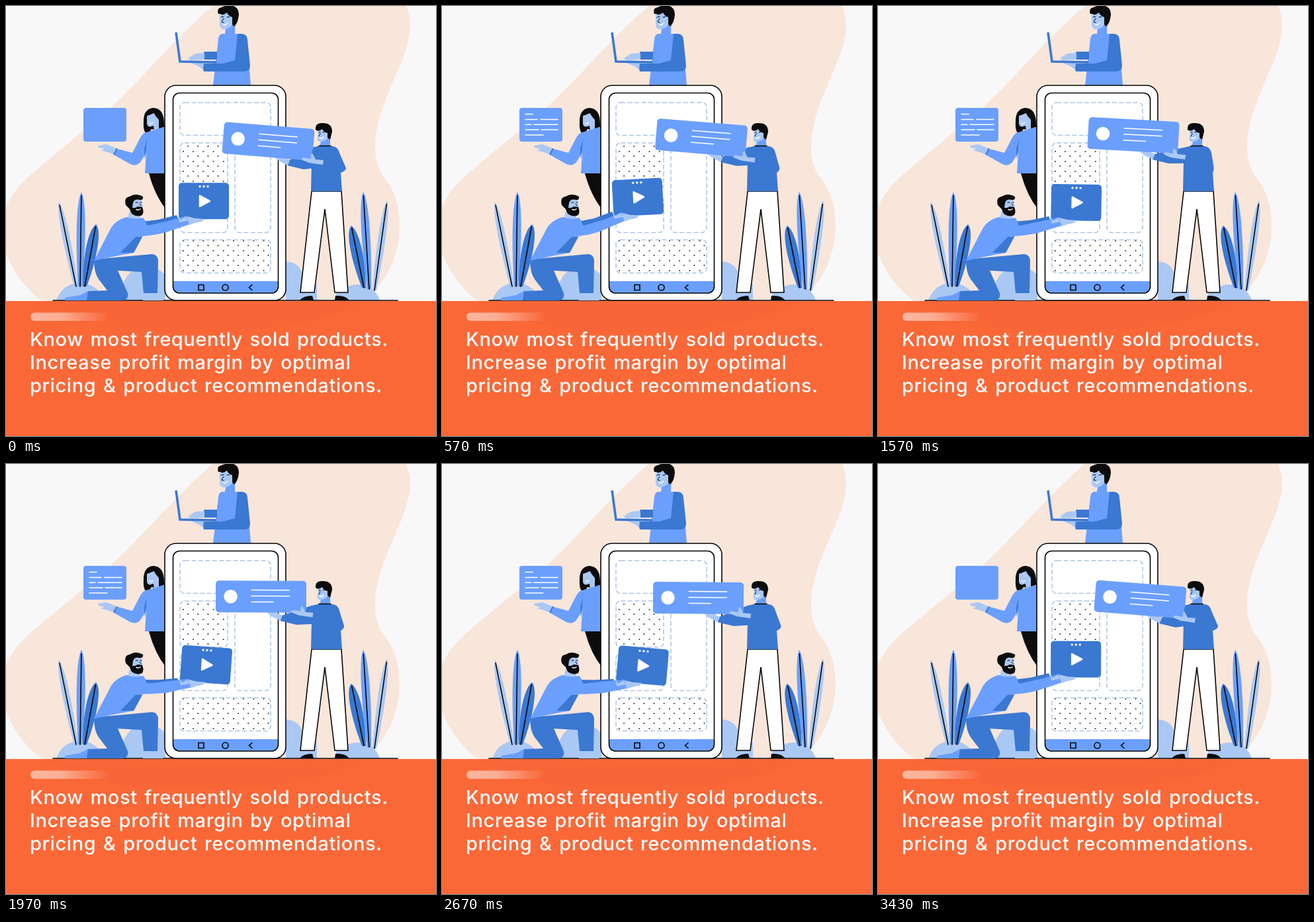
These frames come from a looping animation (650x650 px, 3460 ms). An HTML page:

```html
<!DOCTYPE html>
<html lang="en">
<head>
<meta charset="utf-8">
<title>Product insights</title>
<style>
  html, body { margin: 0; width: 100%; height: 100%; overflow: hidden; background: #f8f8f8; }
  svg { display: block; width: 650px; height: 650px; }
  .mid { fill: #6b9ffd; }
  .dark { fill: #3a78d2; }
  .light { fill: #aac8f4; }
  .ink { fill: #0c0c0c; }
  .white { fill: #fff; }
  .line { fill: none; stroke: #060606; stroke-width: 1.6; stroke-linecap: round; }
  .thin { stroke-width: 1; }
  .rule { fill: none; stroke: #fff; stroke-width: 1.5; stroke-linecap: round; }
  .slot { stroke: #adc4e6; stroke-width: 1.5; stroke-dasharray: 7 3.5; }
  .copy { font: 500 29px Inter, "Open Sans", sans-serif; letter-spacing: .6px; word-spacing: 2.3px; fill: #fff; }
</style>
</head>
<body>
<svg viewBox="0 0 650 650">
  <defs>
    <path id="blob" d="M313 0C286 22 260 49 236 74C208 104 181 132 150 161C106 199 60 234 30 262C8 282-8 312-8 338C-8 372 22 428 62 450C130 487 210 494 300 493C400 492 480 478 532 450C570 430 596 380 595 328C594 292 582 272 570 257C556 238 555 205 563 175C573 135 594 98 604 67C613 39 613 20 605 0Z"/>
    <clipPath id="panelClip"><rect y="446" width="650" height="204"/></clipPath>
    <clipPath id="noteClip"><rect x="117" y="158" width="65" height="41"/></clipPath>
    <linearGradient id="fade">
      <stop offset="0" stop-color="#fff" stop-opacity=".52"/>
      <stop offset=".38" stop-color="#fff" stop-opacity=".46"/>
      <stop offset="1" stop-color="#fff" stop-opacity="0"/>
    </linearGradient>
    <pattern id="dots" x="267" y="204" width="15.2" height="15" patternUnits="userSpaceOnUse">
      <circle class="ink" cx="8" cy="8" r=".9"/>
      <circle class="ink" cx="0.9" cy="1" r=".9"/>
    </pattern>
  </defs>

  <rect width="650" height="650" fill="#f8f8f8"/>
  <use href="#blob" fill="#f9e6da"/>

  <!-- bushes and plants -->
  <path class="light" d="M76 445Q84 423 105 419Q128 417 140 431L150 445ZM172 445Q176 396 210 394Q232 394 241 408V445ZM423 386Q444 388 448 405L470 421V445H423ZM500 445Q506 421 532 421Q557 422 565 445Z"/>
  <g id="plants"></g>
  <path class="line" d="M71 445H592"/>

  <!-- person with laptop -->
  <path class="mid" d="M326 42H350L366 70L370 120H313L321 50Q322 43 326 42Z"/>
  <path class="light" d="M323 13L343 9L347 20L346 42Q338 47 331 42L332 35Q325 37 323 29Z"/>
  <path class="mid" d="M332 35Q340 33 343 27L346 29V42Q338 47 331 42Z"/>
  <path class="ink" d="M321 12Q318 3 326 2Q334-2 344 0Q352 3 352 13Q351 25 345 31L342 28V17Q336 15 334 10Q328 15 324 12Z"/>
  <path class="rule" d="M328 28Q331 30 335 26"/>
  <path class="line thin" d="M325 17L329 16M334 17L338 16M329 19L326 24L329 25"/>
  <path class="dark" d="M299 69H319V81H300ZM350 42H357Q365 43 365 51L369 90Q369 99 360 99H299L296 87L328 87L346 82Z"/>
  <path class="light" d="M300 71L286 72L275 79L279 82L300 81ZM299 86L281 83L279 86L291 91L298 96Z"/>
  <path d="M257 40L263 84L318 85" fill="none" stroke="#3a78d2" stroke-width="3.6"/>

  <!-- person with note -->
  <path class="ink" d="M208 177Q207 156 222 154Q239 154 239 178L242 192L230 188L220 186L214 195Q207 190 208 177ZM216 253H241V306Q225 286 216 253Z"/>
  <path class="light" d="M213 166L226 161L231 171L231 186L224 189L223 181Q214 185 213 178Z"/>
  <path class="ink" d="M211 166Q219 165 223 161Q226 167 231 172L234 162L222 155Z"/>
  <path class="rule" d="M217 177Q219 179 222 176"/>
  <path class="mid" d="M215 190L241 182V253H210L212 222L203 236Q197 243 188 239L163 225L169 216L191 222L203 199Q207 191 215 190Z"/>
  <path class="dark" d="M213 202L211 224L210 232L209 216Z"/>
  <path class="light" d="M169 216L152 209L139 211L140 214L149 216L143 218L157 222L164 225Z"/>
  <path class="dark" d="M169 216L164 225L162 224L167 215Z"/>
  <rect class="mid" x="117" y="154" width="65" height="51" rx="4"/>
  <g clip-path="url(#noteClip)">
    <path id="note" class="rule" d="M126 163.5H137M126 171.5H144M149 171.5H175M126 179.3H135M139 179.3H175M126 187H146M150 187H175M126 195H153"/>
  </g>

  <!-- phone -->
  <rect class="line" x="240" y="120" width="183" height="325" rx="17" style="fill:#fff"/>
  <path class="mid" d="M252.5 416H411.5V425Q411.5 434 402 434H262Q252.5 434 252.5 425Z"/>
  <rect class="line" x="252.5" y="131.5" width="159" height="302.5" rx="10"/>
  <path class="line" d="M291 421.5H299V429.5H291ZM372 421.5L367.5 425.5L372 429.5"/>
  <circle class="line" cx="331.5" cy="425.5" r="4.5"/>
  <g class="slot" fill="none">
    <rect x="263" y="146" width="137" height="49.5" rx="7"/>
    <rect x="263" y="207" width="72" height="70" rx="7" fill="url(#dots)"/>
    <rect x="263" y="287" width="72" height="55.5" rx="7"/>
    <rect x="346" y="207" width="54" height="135.5" rx="7"/>
    <rect x="263" y="353.5" width="137" height="50" rx="7" fill="url(#dots)"/>
  </g>

  <!-- kneeling person -->
  <path class="light" d="M88 443L105 430L124 428L128 445H90ZM207 432H229L238 445H207Z"/>
  <path class="mid" d="M89 441L112 437L124 431V445H90Z"/>
  <path class="dark" d="M133 383L221 375Q230 376 230 386L229 434H208L205 402L169 400L184 434Q186 445 174 445H122L124 431L153 430L140 413Q133 403 133 383Z"/>
  <path id="armBack" class="dark"/>
  <path class="light" d="M188 294L204 291L207 304L203 314L203 322H184L187 309Z"/>
  <path class="ink" d="M181 301Q178 289 187 288Q196 282 207 288Q208 294 202 293Q194 291 192 298L191 305Q196 306 199 303L206 304Q209 311 206 316Q198 320 190 314L187 307Z"/>
  <path class="rule" d="M197 307.5Q200 309 203 307"/>
  <path class="line thin" d="M196 297L199 297M203 297L205 297M202 299L204 302"/>
  <path class="mid" d="M182 319Q196 324 207 320Q214 326 211 340L193 373Q165 378 133 385L159 335Q166 324 182 319Z"/>
  <path class="dark" d="M173 373L196 349H206L193 373Z"/>
  <g id="video">
    <rect class="dark" x="-38" y="-27.5" width="76" height="55" rx="5"/>
    <path class="white" d="M-6-8L9 0L-6 8Z" stroke="#fff" stroke-width="2.5" stroke-linejoin="round"/>
    <circle class="white" cx="-6" cy="-22" r="1.7"/>
    <circle class="white" cx="0" cy="-22" r="1.7"/>
    <circle class="white" cx="6" cy="-22" r="1.7"/>
  </g>
  <path id="armFront" class="mid"/>
  <path id="palm" class="light" d="M274 318L286 321L300 322L296 326L286 328L277 331ZM260 317L264 323L272 318L276 324L262 327Z"/>

  <!-- standing person -->
  <path class="light" d="M451 432H463L464 440H451ZM499 432H510L510 440H499Z"/>
  <path class="ink" d="M444 445Q449 438 463 438L465 445ZM497 445L498 438Q512 437 519 445Z"/>
  <path class="line" d="M462 280H507L517 433H497L482 307L466 433H445Z" style="fill:#fff"/>
  <path id="sleeve" class="dark"/>
  <path id="farHand" class="light" d="M404 227L414 226L429 233L426 241L412 234Z"/>
  <g id="card">
    <rect class="mid" x="-68.5" y="-24" width="137" height="48" rx="5"/>
    <circle class="white" cx="-46" cy="0" r="10.3"/>
    <path class="rule" d="M-14.5-10H43M-14.5-1H43M-14.5 8H19"/>
  </g>
  <path class="light" d="M472 187L487 184L490 195L490 212H474L475 205Q470 206 471 199Z"/>
  <path class="mid" d="M477 205Q484 204 487 199L490 200V212H474Z"/>
  <path class="ink" d="M468 187Q467 176 479 177Q493 177 493 190L490 202L486 199V192Q480 191 478 186Q472 191 468 187Z"/>
  <path class="rule" d="M474 199Q477 202 480 198"/>
  <path class="line thin" d="M473 191L475 191M479 191L482 190M475 193L473 197"/>
  <path id="torso" class="dark"/>
  <path class="line" d="M473 211.5H491"/>
  <path id="nearHand" class="light" d="M480 233L468 232L464 224Q461 222 461 226L461 231L449 229L446 232L458 237L479 240Z"/>

  <!-- caption -->
  <rect y="446" width="650" height="204" fill="#fa6838"/>
  <use href="#blob" fill="#f46536" opacity=".45" clip-path="url(#panelClip)"/>
  <rect x="37" y="463.5" width="119" height="12.5" rx="6.2" fill="url(#fade)"/>
  <text class="copy" x="36" y="514">Know most frequently sold products.</text>
  <text class="copy" x="36" y="549">Increase profit margin by optimal</text>
  <text class="copy" x="36" y="584">pricing &amp; product recommendations.</text>
</svg>

<script>
const LOOP = 3460;
const NOTE_LOOP = LOOP / 3;
const $ = id => document.getElementById(id);

// Leaves: tip, base, half width, tone
const leaves = [
  [80, 296, 106, 424, 7, 'light'],
  [114, 281, 112, 424, 8, 'mid'],
  [136, 330, 119, 424, 11, 'dark'],
  [522, 332, 541, 426, 11, 'dark'],
  [540, 281, 549, 428, 8, 'mid'],
  [576, 294, 557, 430, 7, 'light']
];
$('plants').innerHTML = leaves.map(([x, y, bx, by, w, tone]) => {
  const at = (k, side) => `${x + (bx - x) * k + side * w} ${y + (by - y) * k}`;
  return `<path class="${tone}" d="M${x} ${y}C${at(.1, 1)} ${at(.55, 1)} ${bx + 3} ${by}H${bx - 3}C${at(.55, -1)} ${at(.1, -1)} ${x} ${y}Z"/>` +
    `<path class="line" d="M${at(.04, 0)}L${bx} ${by}"/>`;
}).join('');

// Poses: time, x, y, angle
const cardPoses = [
  [0, 396.5, 204.5, 4.6], [570, 392, 199.3, 4.7], [1070, 386.5, 193, 4.9],
  [1570, 386, 195.5, 3.1], [1970, 385.5, 200.5, .2], [2670, 387.5, 202.5, .5]
];
const videoPoses = [
  [0, 299, 294.8, 0], [570, 296, 289, -3.1], [1070, 294.5, 287, -4],
  [1570, 299.7, 297, 1], [1970, 302.5, 303.5, 4], [2670, 303, 304.8, 4.9]
];

// Periodic cubic through the poses
function pose(list, t) {
  const n = list.length;
  const key = i => {
    const turn = Math.floor(i / n), [time, ...v] = list[i - turn * n];
    return [time + turn * LOOP, ...v];
  };
  let i = n - 1;
  while (list[i][0] > t) i--;
  const [a, b, c, d] = [i - 1, i, i + 1, i + 2].map(key);
  const span = c[0] - b[0], u = (t - b[0]) / span;
  return [1, 2, 3].map(k => {
    const mb = (c[k] - a[k]) / (c[0] - a[0]) * span;
    const mc = (d[k] - b[k]) / (d[0] - b[0]) * span;
    const v = u * u, w = v * u;
    return b[k] * (2 * w - 3 * v + 1) + mb * (w - 2 * v + u) + c[k] * (3 * v - 2 * w) + mc * (w - v);
  });
}

const shift = (id, x, y, turn = 0) =>
  $(id).setAttribute('transform', `translate(${x} ${y}) rotate(${turn})`);
const shape = (id, d) => $(id).setAttribute('d', d);

// The note's lines rise into view, rest, then drop out
function noteOffset(p) {
  if (p < 300) return 48 * (1 - p / 300) ** 3;
  return p > 1000 ? 7.5 * ((p - 1000) / 70) ** 3 : 0;
}

function draw(t) {
  const [cx, cy, ca] = pose(cardPoses, t);
  const dx = cx - 396.5, dy = cy - 204.5, elbow = 514 + dy * .7;
  shift('card', cx, cy, ca);
  shift('farHand', dx, dy);
  shift('nearHand', dx * 1.42, dx * .75);
  shape('sleeve', `M472 212L462 214L${428 + dx} ${233 + dy}L${425 + dx} ${241 + dy}L${450 + dx} ${247 + dy}L466 ${245 + dy * .8}Z`);
  shape('torso', `M470 212H494Q502 213 504 222L${elbow} 245Q${elbow} 249 506 252L508 280H461L462 236L463 218Z`);

  const [vx, vy, va] = pose(videoPoses, t);
  const hx = (vx - 299) * .6, hy = (vy - 294.8) * .9;
  shift('video', vx, vy, va);
  shift('palm', hx, hy);
  shape('armBack', `M205 326L230 ${323 + hy * .4}L${258 + hx * .5} ${316 + hy}L${262 + hx * .5} ${326 + hy}L215 340Z`);
  shape('armFront', `M205 321L214 332L245 ${325 + hy * .4}L${274 + hx} ${317 + hy}L${278 + hx} ${330 + hy}L242 ${342 + hy * .5}Q220 348 198 348L195 326Z`);

  shift('note', 0, noteOffset(t % NOTE_LOOP));
}

function tick() {
  draw(performance.now() % LOOP);
  requestAnimationFrame(tick);
}
tick();
</script>
</body>
</html>
```
